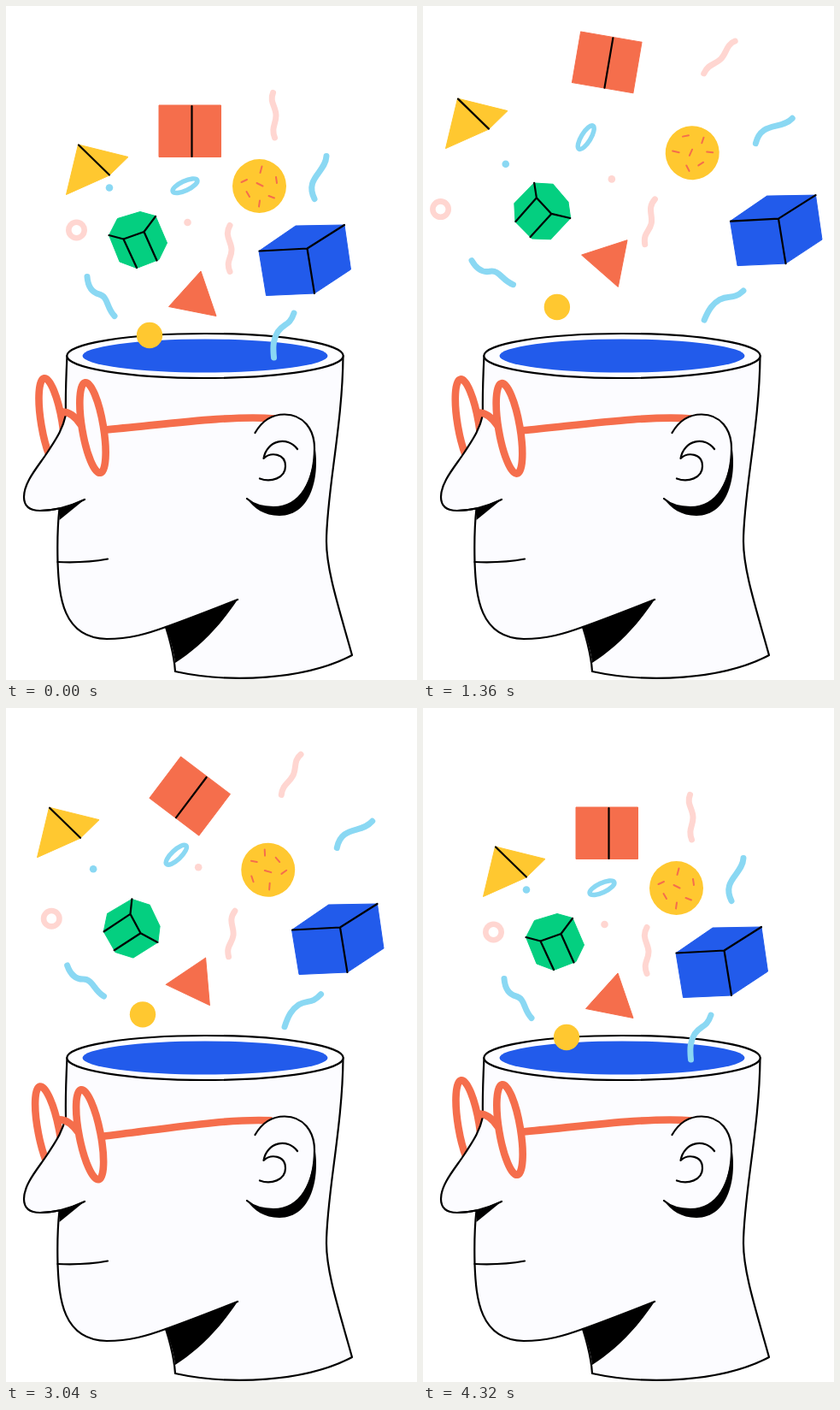
Recreate the animation shown at these times as an HTML page. Size 481 px wide and 788 px high, loop 4.36 s.

```html
<!DOCTYPE html>
<html lang="en">
<head>
<meta charset="utf-8">
<title>Open mind</title>
<style>
  html, body { margin: 0; width: 100%; height: 100%; overflow: hidden; background: #fff; }
  svg { display: block; width: 481px; height: 788px; }
  .line { fill: none; stroke: #000; stroke-width: 2.2; stroke-linecap: round; stroke-linejoin: round; }
  .skin { fill: #fcfcff; }
  .frame { fill: none; stroke: #f56e4c; stroke-width: 8.6; }
</style>
</head>
<body>
<svg viewBox="0 0 481 788">
  <g class="glasses">
    <ellipse class="frame" cx="53.5" cy="488" rx="12.3" ry="53.5" transform="rotate(-9.5 53.5 488)"/>
  </g>

  <path class="line" style="fill:#fcfcff" d="M71.5 409C70 440 69.5 458 70 478C66 496 58 507 49 521
    C38 538 21 556 21 574C21 585 28 590 40 590C48 590 55 589 62.5 587.5C60 610 60 630 60.5 650
    C62 690 66 739 118 740C145 740 165 734 187 726C192 742 197 760 198 778
    C262 792 350 788 405 759C390 705 375 660 375 626C375 570 394 490 394.5 409Z"/>
  <path d="M62.5 587.5L92 577L62.5 601Z"/>
  <path d="M187 726L271 694C249 727 226 750 198 768C196 752 192 740 187 726Z"/>
  <path class="line" d="M40 590C58 590 75 585 92 577M187 726C215 716 243 705 271 694M60.5 650C82 651 100 650 119 646.5"/>
  <ellipse class="line" style="fill:#fdfdff" cx="233" cy="409" rx="161.7" ry="26"/>
  <ellipse cx="233" cy="409" rx="143.5" ry="19.5" fill="#225beb"/>

  <g class="glasses">
    <path class="frame" d="M65 474.5C75 474 82 481 88 490"/>
    <path class="frame" d="M116 495.5C180 490 262 478 315 482.5"/>
    <ellipse class="frame" cx="101.5" cy="493" rx="12.5" ry="53.5" transform="rotate(-9.5 101.5 493)"/>
  </g>

  <path class="skin" d="M291.5 499C299 486 311 477 326 477C348 477 361 495 361 517C361 555 345 586 315 586C301 586 290 582 282 576Z"/>
  <path d="M282 576C290 583 301 586 313 586C345 586 361 553 361 512C368 548 358 596 320 596C302 596 290 587 282 576Z"/>
  <path class="line" d="M291.5 499C299 486 311 477.5 326 477.5C348 477.5 361 495 361 517C361 555 345 586 313 586C301 586 290 583 282 576
    M341 518C329 502 305 508 301.5 529C310 521 327 523 327 538C327 552 310 557.5 297 552.5"/>

  <g id="bits"></g>
</svg>
<script>
const LOOP = 4360, STEP = 40, REST = 4320;
const RISE_TIME = 1900, FALL_TIME = 2050;
const ORANGE = '#f56e4c', YELLOW = '#ffc830', GREEN = '#04cf80', BLUE = '#225beb', SKY = '#8ad8f3', PINK = '#ffd6d1';

const ramp = (t, from, to) => Math.min(1, Math.max(0, (t - from) / (to - from)));
const cubic = u => u < .5 ? 4 * u ** 3 : 1 - 4 * (1 - u) ** 3;
const sine = u => (1 - Math.cos(Math.PI * u)) / 2;
const around = (t, mid, length) => cubic(ramp(t, mid - length / 2, mid + length / 2));
const swing = (t, [a, b, c, d]) => sine(ramp(t, a, b)) - sine(ramp(t, c, d));

// drift: furthest offset; rise, fall: midpoints of the way out and back;
// bow: how far the path arcs upward; tilt: turn along the way;
// spin over its span of times: own turn out and back; roll: steady turn.
const bits = [];
function bit(cx, cy, art, motion) {
  const el = document.createElementNS('http://www.w3.org/2000/svg', 'g');
  el.innerHTML = art;
  document.getElementById('bits').append(el);
  bits.push({ el, cx, cy, rise: 1130, fall: 3020, bow: .85, tilt: 0, spin: 0, span: [0, 1, 0, 1], roll: 0, ...motion });
}
const poly = (points, color) =>
  `<polygon points="${points}" fill="${color}" stroke="${color}" stroke-linejoin="round"/>`;
const stroke = (d, color, width = 7) =>
  `<path d="${d}" fill="none" stroke="${color}" stroke-width="${width}" stroke-linecap="round" stroke-linejoin="round"/>`;
const edge = d => stroke(d, '#000', 2.2);
const disc = (x, y, r, color) => `<circle cx="${x}" cy="${y}" r="${r}" fill="${color}"/>`;
const ring = (x, y, rx, ry, width, color) =>
  `<ellipse cx="${x}" cy="${y}" rx="${rx}" ry="${ry}" fill="none" stroke="${color}" stroke-width="${width}"/>`;

// Solids
bit(215, 146.2, poly('179,116 251.5,116 251.5,176.5 179,176.5', ORANGE) + edge('M217.5 117V176'),
  { drift: [0, -104], rise: 1140, fall: 2980, bow: 0, spin: 720, span: [470, 2220, 2400, 3770] });

bit(106, 191, poly('84.5,162 143,176.5 121,198 70.5,220.5', YELLOW) + edge('M85 162.5L121 197.5'),
  { drift: [-66, -63], rise: 1240, fall: 3050 });

bit(296.5, 210.5, disc(296.5, 210.5, 31.5, YELLOW) +
  stroke('M275.5 206L282 203M297.5 195L299.5 187.5M316 200L317 207M293.5 207L300.5 210.5' +
    'M281.5 217L285 223M307.5 222L314 224.5M296 234.5L297 227.5', ORANGE, 2),
  { drift: [20.5, -42.5], rise: 940, fall: 3040, bow: 0, tilt: 45, roll: 720 });

bit(154.5, 273.5, poly('157,240.5 175,245.5 188.5,277 179,296.5 153,306.5 133,299 120.5,268 130.5,248.5', GREEN) +
  edge('M120.5 268L137.5 272.5L161.5 264L175 246M137.5 272.5L153 306M161.5 264L176.5 297.5'),
  { drift: [-17.5, -37], rise: 970, fall: 2985, bow: 0, spin: 610, span: [610, 1800, 2490, 4050] });

bit(350, 298, poly('296,286.5 339,257 396,256 403.5,308 361,336 304.5,338.5', BLUE) +
  edge('M296.5 286.5L352.5 283.5L396 256M352.5 283.5L361 336'),
  { drift: [77, -36], rise: 1080, fall: 3040, bow: 1 });

bit(221.5, 341, poly('228,310 246,362.5 190.5,351.5', ORANGE),
  { drift: [-4, -48], rise: 950, fall: 2985, bow: 0, tilt: 33 });

// Dots and rings
bit(168, 385, disc(168, 385, 15.2, YELLOW), { drift: [-17, -39], rise: 1250 });
bit(121, 212.5, disc(121, 212.5, 4.3, SKY), { drift: [-31, -30], fall: 3120 });
bit(212.5, 253, disc(212.5, 253, 4.3, PINK), { drift: [19, -78], rise: 1400, fall: 3170 });
bit(82.5, 262, ring(82.5, 262, 9.2, 9.2, 6.6, PINK), { drift: [-69, -25], rise: 970, fall: 2985 });
bit(209.5, 210.2, `<g transform="rotate(-25 209.5 210.2)">${ring(209.5, 210.2, 15.8, 5.5, 5.4, SKY)}</g>`,
  { drift: [-24, -61], fall: 2985, tilt: -43 });

// Squiggles
bit(313.5, 127.5, stroke('M312.5 101.5C308 112 316 118 316 128C316 138 310 142 314.5 154', PINK),
  { drift: [43, -73], tilt: 59 });
bit(262, 283.5, stroke('M262 256.5C255 269 264 275 264 285C264 295 257 298 262 310.5', PINK),
  { drift: [4, -35], rise: 980, fall: 3080, bow: 0, tilt: 14 });
bit(368, 200.5, stroke('M375 175.5C374 195 349 201 361 225.5', SKY),
  { drift: [61, -62], rise: 1210, fall: 3160, tilt: 57 });
bit(111, 339.5, stroke('M95 316.5C96 329 101 335 109 337C120 340 117 352 127 362.5', SKY),
  { drift: [-38, -30], tilt: -32 });
bit(325.5, 385, stroke('M337 359C332 374 325 371 318 381C313 389 312 397 313.5 411', SKY),
  { drift: [37, -39], rise: 1190, fall: 3110, tilt: 40 });

const SLIPS = [[290, 920, 940, 1440], [2780, 3380, 3400, 3930]];
const glasses = document.querySelectorAll('.glasses');

function draw(now) {
  const t = Math.floor(now % LOOP / STEP) * STEP;
  for (const b of bits) {
    const p = around(t, b.rise, RISE_TIME) - around(t, b.fall, FALL_TIME);
    const x = b.drift[0] * p, y = b.drift[1] * p * (1 + b.bow * (1 - p));
    const turn = b.tilt * p + b.spin * swing(t, b.span) + b.roll * t / REST;
    b.el.setAttribute('transform', `translate(${x} ${y}) rotate(${turn} ${b.cx} ${b.cy})`);
  }
  const slip = SLIPS.reduce((sum, span) => sum + swing(t, span), 0);
  for (const g of glasses)
    g.setAttribute('transform', `translate(${-9.5 * slip} 0) rotate(${-4 * slip} 310 482)`);
}

const start = performance.now();
function tick() {
  draw(performance.now() - start);
  requestAnimationFrame(tick);
}
tick();
</script>
</body>
</html>
```
